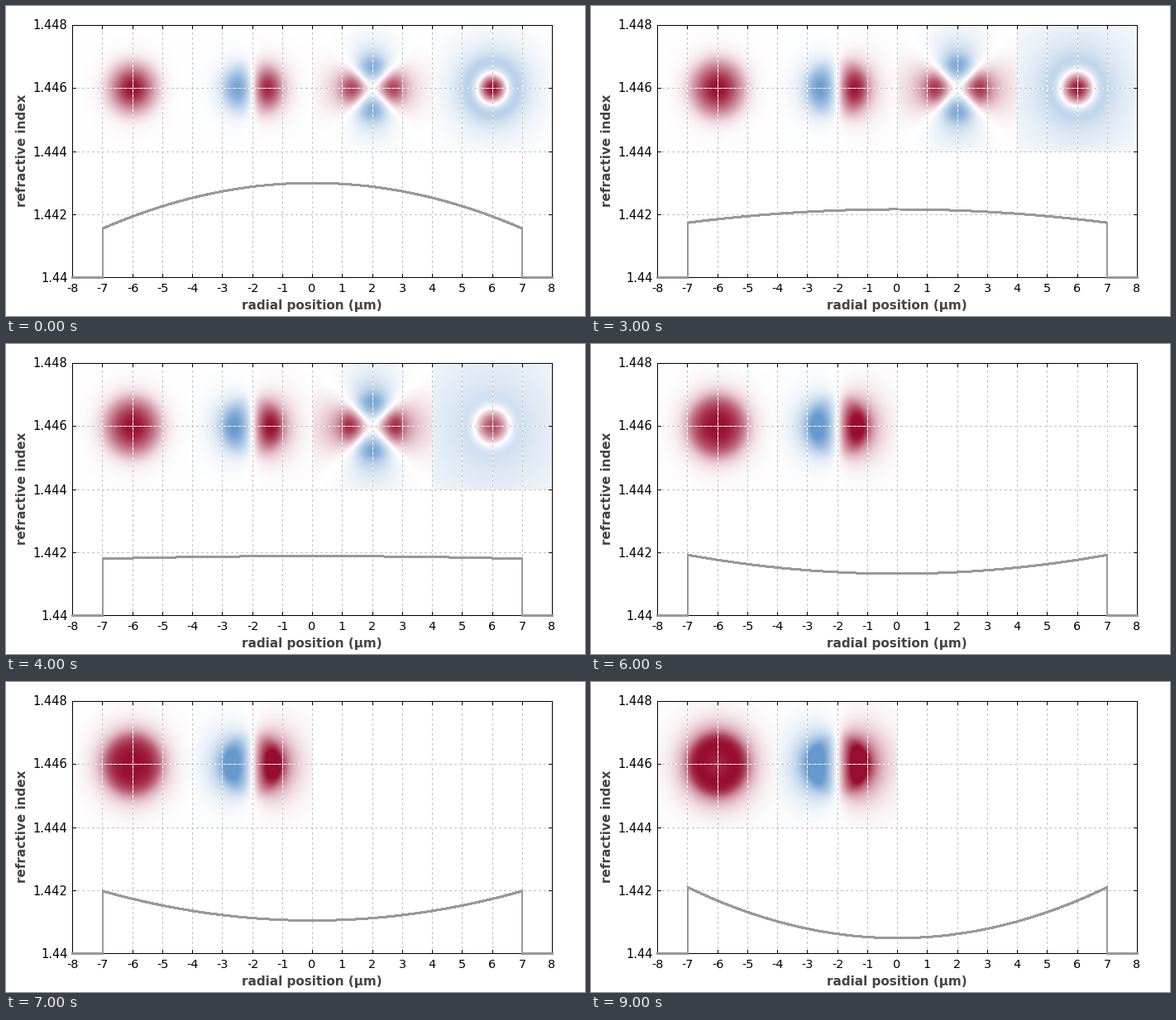
A matplotlib script for the animation above (10 s loop, 700 by 375 pixels).

```python
import numpy as np
import matplotlib.pyplot as plt
from matplotlib.animation import FuncAnimation

W_PX, H_PX, DPI = 700, 375, 100
LEFT, RIGHT, TOP, BOTTOM = 80.5, 660.5, 23.5, 328.5
UX = (RIGHT - LEFT) / 16       # pixels per micrometre
UY = (BOTTOM - TOP) / 8        # pixels per 0.001 of index
FRAMES = 10
RED = np.array([152, 13, 48]) / 255
BLUE = np.array([102, 153, 206]) / 255
GRAY = "#999999"

CORE, WAVELENGTH, CLADDING = 7.0, 0.8, 1.44
# squared normalized frequency per 0.001 of index contrast
C = (2 * np.pi * CORE / WAVELENGTH) ** 2 * 2 * CLADDING * 1e-3

# (azimuthal order, radial order, centre in micrometres)
MODES = [(0, 0, -6), (1, 0, -2), (2, 0, 2), (0, 1, 6)]
T = np.linspace(0, 7, 300)


def px(x):
    return LEFT + (x + 8) * UX


def py(n):
    return BOTTOM - n * UY


def center(p):
    """Nearest pixel centre, so that thin lines stay crisp."""
    return np.floor(p) + 0.5


def profile(i):
    """Index at the core centre and edge, in 0.001 above the cladding."""
    s = i / (FRAMES - 1)
    return 3 - 2.51 * s, 1.555 + 0.55 * s


def bessel_k(m, x):
    x = np.atleast_1d(x)[:, None]
    f = np.exp(-x * np.cosh(T)) * np.cosh(m * T)
    return (f.sum(axis=1) - f[:, 0] / 2) * (T[1] - T[0])


def core_series(m, a, b, terms=32):
    """Power series in r^2 of the core field for a quadratic profile."""
    c = [np.ones_like(a)]
    for j in range(1, terms):
        prev = c[j - 2] if j > 1 else 0
        c.append(-(a * c[-1] + b * prev) / ((m + 2 * j) ** 2 - m * m))
    return np.array(c)


def solve(m, n0, n1):
    """Effective indices of the guided modes, highest first."""
    x = np.linspace(0.005, max(n0, n1), 2500)
    w = np.sqrt(C * x)
    c = core_series(m, C * (n0 - x), C * (n1 - n0))
    order = m + 2 * np.arange(len(c))[:, None]
    slope_k = -(bessel_k(m - 1, w) + bessel_k(m + 1, w)) / 2
    f = (order * c).sum(axis=0) * bessel_k(m, w) - c.sum(axis=0) * w * slope_k
    j = np.nonzero(f[:-1] * f[1:] < 0)[0]
    roots = x[j] - f[j] * (x[j + 1] - x[j]) / (f[j + 1] - f[j])
    return roots[::-1]


R_IN = np.linspace(0, 1, 400)
R_OUT = np.linspace(1, 3, 400)


def radial(m, x, n0, n1):
    """Radial field normalized to unit power."""
    c = core_series(m, np.array(C * (n0 - x)), C * (n1 - n0))
    inner = R_IN ** m * np.polyval(c[::-1], R_IN ** 2)
    w = np.sqrt(C * x)
    k0, k1, k2 = (bessel_k(m + d, w)[0] for d in (-1, 0, 1))
    outer = inner[-1] * bessel_k(m, w * R_OUT) / k1
    power = np.mean(inner ** 2 * R_IN)
    power += inner[-1] ** 2 * (k0 * k2 / k1 ** 2 - 1) / 2
    power *= np.pi if m else 2 * np.pi
    return np.concatenate([inner, outer[1:]]) / np.sqrt(power)


R_ALL = np.concatenate([R_IN, R_OUT[1:]])
COLS, ROWS = np.arange(80, 661), np.arange(23, 177)
GX, GY = np.meshgrid((COLS + 0.5 - LEFT) / UX - 8, 6 - (BOTTOM - ROWS - 0.5) / UY)


def mode_image(i):
    n0, n1 = profile(i)
    roots = {m: solve(m, n0, n1) for m in (0, 1, 2)}
    scale = radial(0, roots[0][0], n0, n1).max()
    v = np.zeros_like(GX)
    for m, p, cx in MODES:
        if len(roots[m]) <= p:
            continue
        u = GX - cx
        box = np.abs(u) <= 2
        r, phi = np.hypot(u, GY), np.arctan2(GY, u)
        field = np.interp(r, R_ALL, radial(m, roots[m][p], n0, n1))
        v = np.where(box, field * np.cos(m * phi) / scale, v)
    v = np.clip(v, -1, 1)[..., None]
    return 1 - np.abs(v) * (1 - np.where(v > 0, RED, BLUE))


def index_line(i):
    n0, n1 = profile(i)
    x = np.linspace(-7, 7, 281)
    n = n0 + (n1 - n0) * (x / 7) ** 2
    xs = px(np.concatenate([[-8, -7], x, [7, 8]]))
    ys = py(np.concatenate([[0, 0], n, [0, 0]])) - 0.05
    # upright sides sit on whole pixels
    xs[1:3], xs[-3:-1] = np.round(xs[1]), np.round(xs[-2])
    return xs, ys


fig = plt.figure(figsize=(W_PX / DPI, H_PX / DPI), dpi=DPI, facecolor="white")
ax = fig.add_axes([0, 0, 1, 1])
ax.axis("off")
PT = 72 / DPI


def stroke(x, y, color="black", width=1, z=4, **kw):
    return ax.plot(x, y, color=color, lw=width * PT, zorder=z, snap=False,
                   solid_joinstyle="miter", **kw)[0]


def label(x, y, s, size, **kw):
    ax.text(x, y, s, fontsize=size * PT, family="DejaVu Sans", **kw)


def grid(x, y):
    """Gray dashes with opaque white gaps."""
    stroke(x, y, "white", z=2, solid_capstyle="butt")
    stroke(x, y, "#c0c0c0", z=2, dashes=(3, 3), dash_capstyle="butt")


for x in range(-8, 9):
    p = center(px(x))
    if abs(x) < 8:
        grid([p, p], [BOTTOM + 0.5, TOP - 0.5])
    stroke([p, p], [BOTTOM, BOTTOM - 4])
    stroke([p, p], [TOP, TOP + 4])
    label(p - 0.5, 346, str(x), 14.4, ha="center", va="baseline")

for n in range(0, 9, 2):
    p = center(py(n))
    if 0 < n < 8:
        grid([LEFT - 0.5, RIGHT + 0.5], [p, p])
    stroke([LEFT, LEFT + 4], [p, p])
    stroke([RIGHT, RIGHT - 4], [p, p])
    label(74.5, p + 5, f"{1.44 + n / 1000:.4g}", 14.6, ha="right", va="baseline")

stroke([LEFT, RIGHT, RIGHT, LEFT, LEFT], [TOP, TOP, BOTTOM, BOTTOM, TOP])
label(369.7, 367.5, "radial position (µm)", 15.3, ha="center", va="baseline",
      weight="bold", color="#444444")
label(19.5, 174.7, "refractive index", 15.3, ha="center", va="center",
      weight="bold", color="#444444", rotation=90)

images = [mode_image(i) for i in range(FRAMES)]
picture = ax.imshow(images[0], extent=(80, 661, 177, 23), aspect="auto",
                    interpolation="nearest", zorder=1)
curve = stroke(*index_line(0), GRAY, 2, z=5, antialiased=False)
ax.set_xlim(0, W_PX)
ax.set_ylim(H_PX, 0)


def update(i):
    picture.set_data(images[i])
    curve.set_data(*index_line(i))
    return picture, curve


anim = FuncAnimation(fig, update, frames=FRAMES, interval=1000, repeat=True,
                     repeat_delay=0)
plt.show()
```
